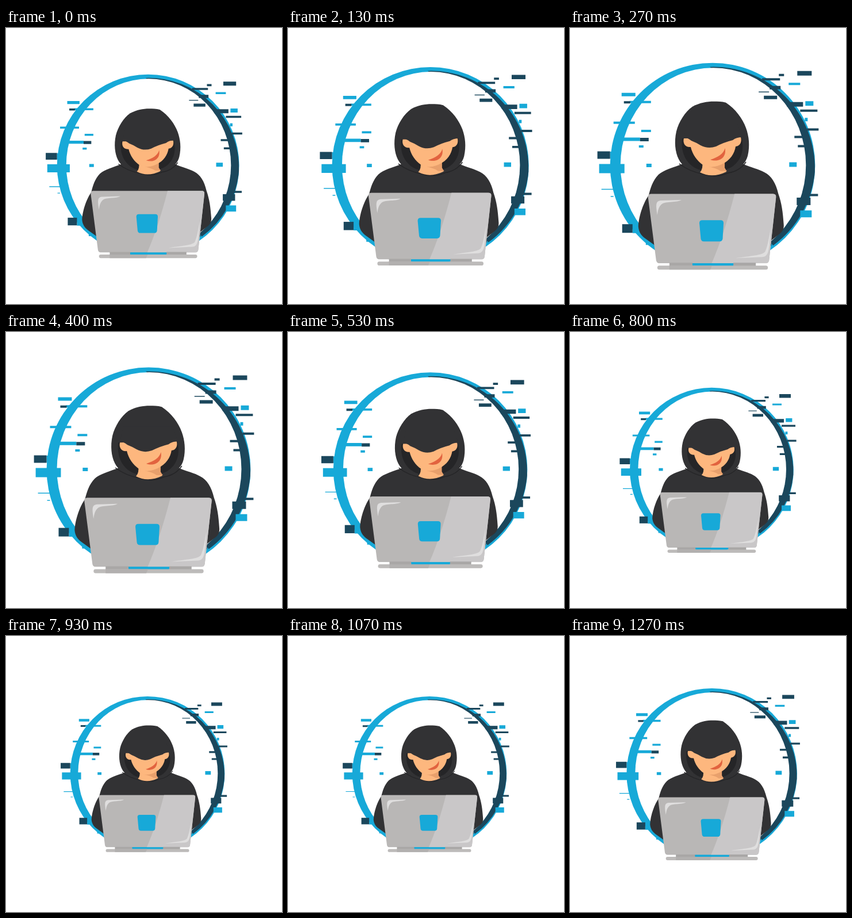
An HTML page for the animation above (1340 ms loop, 480 px wide and 480 px high).

```html
<!DOCTYPE html>
<html lang="en">
<head>
<meta charset="utf-8">
<title>Hooded figure at a laptop</title>
<style>
  html, body { margin: 0; height: 100%; overflow: hidden; background: #fff; }
  svg { display: block; width: 100vw; height: 100vh; }
  .light { fill: #17a9d8; }
  .dark { fill: #1b475c; }
  .cloth { fill: #323234; }
  .shade { fill: #252527; }
  .skin { fill: #fdb77e; }
  .gloss { fill: #dfdede; }
  .light-bars { stroke: #17a9d8; }
  .dark-bars { stroke: #1b475c; }
</style>
</head>
<body>
<svg viewBox="0 0 480 480">
  <defs>
    <clipPath id="lid"><path d="M141 288.500H353Q359 288.500 358 295L346 404Q345 409 340 409H156Q151 409 150 404L136 295Q135 288.500 141 288.500Z"/></clipPath>
  </defs>
  <g id="scene">
    <!-- ring -->
    <circle class="light" cx="248" cy="239" r="178"/>
    <path class="dark" d="M243 68A176 176 0 0 1 425.500 250A178 178 0 0 1 353 378L320 340V120Z"/>
    <ellipse cx="249" cy="238.500" rx="161" ry="169" fill="#fff"/>

    <!-- glitch bars -->
    <g class="light-bars">
      <path stroke-width="1.500" d="M55 280.500h22M71 293h5"/>
      <path stroke-width="4" d="M104 129h37M76 165h37M124 179h17M120 206h8M380 97.500h20"/>
      <path stroke-width="6" d="M90 116h24M88 193.500h34M133 239h9M408 159.500h5"/>
      <path stroke-width="8" d="M132 373h13M409 131.500h14M381 237.500h13"/>
      <path stroke-width="12" d="M70 221h18M400 323h20"/>
      <path stroke-width="16" d="M51 244.500h44M109 348.500h10"/>
    </g>
    <g class="dark-bars">
      <path stroke-width="1.500" d="M328 111.500h18"/>
      <path stroke-width="4" d="M94 129.500h11M363 82h9M334 89.500h31M400 144h30M412 176.500h20M390 189.500h20M396 205.500h20M407 290.500h24"/>
      <path stroke-width="6" d="M122 194h15M347 104h19M337 121h23"/>
      <path stroke-width="8" d="M395 79h25M377 133h28"/>
      <path stroke-width="13" d="M48 221h22M394 301.500h24"/>
      <path stroke-width="15" d="M91 348.500h18"/>
    </g>

    <!-- body and hood -->
    <path class="cloth" d="M200 235C178 243 163 247 154 255C144 265 140 279 137 291C129 302 120 325 119 345C120 355 124 360 130 365L148 378H350V369L364 358C369 354 372 350 371.500 342C370 320 368 305 362 288C358 270 350 257 338 251C328 245 315 243 300 236Z"/>
    <path class="cloth" d="M250 128C238 128 226 130 213 137C200 146 189 164 185 180C181 198 183 216 189 228C195 240 205 246 222 251L247 257L285 247C298 242 306 234 309 222C313 204 311 188 306 174C300 158 288 141 271 130C264 128 257 128 250 128Z"/>
    <path class="shade" d="M195 192C192 219 204 242 230 248L271 246C295 239 305 214 298 190Z"/>
    <path d="M190 236Q208 250 232 254Q253 262 275 252Q295 249 306 233" fill="none" stroke="#252527" stroke-width="1.500"/>

    <!-- face -->
    <path class="skin" d="M231 232L230 243Q229 248 226 251Q247 262 272 250Q267 245 267 235Z"/>
    <path d="M238 241Q254 244 269 233V243Q271 247 273 249L262 249Q254 243 238 241Z" fill="#e8a06c"/>
    <path class="skin" d="M198 192C196 200 200 208 210 207C213 220 221 231 231 238Q247 245 264 237C279 230 286 218 288 206C296 205 299 198 297 190Z"/>
    <path class="cloth" d="M198 190Q205 191 211 196Q219 199 227 204Q240 211 254 206Q267 199 283 195Q289 190 299 190L290 164H204Z"/>
    <path d="M269.500 209C267 219 257 225 244 229C257 234 273 227 269.500 209Z" fill="#e2633f"/>

    <!-- laptop -->
    <g clip-path="url(#lid)">
      <path d="M130 285H365V412H130Z" fill="#b9b7b6"/>
      <path d="M287 285H365V412H245Q268 360 287 285Z" fill="#c9c7c8"/>
    </g>
    <path class="gloss" d="M152 325C149 306 149 300 160 300L194 299C186 304 167 301 160 306C154 311 153 318 152 325Z"/>
    <path class="gloss" d="M349 347C346 387 346 397 334 398L288 400C315 396 334 395 339 389C344 379 346 363 349 347Z"/>
    <path class="light" d="M230 334H262Q267 334 267 339L265.500 366Q265 371 260 371H233Q228 371 227.500 366L225 339Q225 334 230 334Z"/>
    <path d="M173 408H213V414H173ZM284 408H323V414H284Z" fill="#a9a7a6"/>
    <path class="light" d="M213 409H284V411H213Z"/>
    <rect x="152" y="413" width="192" height="7" rx="3.500" fill="#bdbbba"/>
    <path d="M173 413H247L244 420H173Z" fill="#b2b0af"/>
  </g>
</svg>
<script>
  // The scene breathes along a cosine, held in 20 steps per loop
  const LOOP = 1340, STEPS = 20;
  const scene = document.getElementById("scene");

  function draw() {
    const tick = Math.floor(performance.now() % LOOP / 10);
    const step = Math.min(Math.floor((tick + .5) * 3 / 20), STEPS - 1);
    const scale = .877 + .1285 * Math.cos(.307 * step - 1.47);
    scene.setAttribute("transform", `translate(240 240) scale(${scale}) translate(-240 -240)`);
    requestAnimationFrame(draw);
  }
  draw();
</script>
</body>
</html>
```
